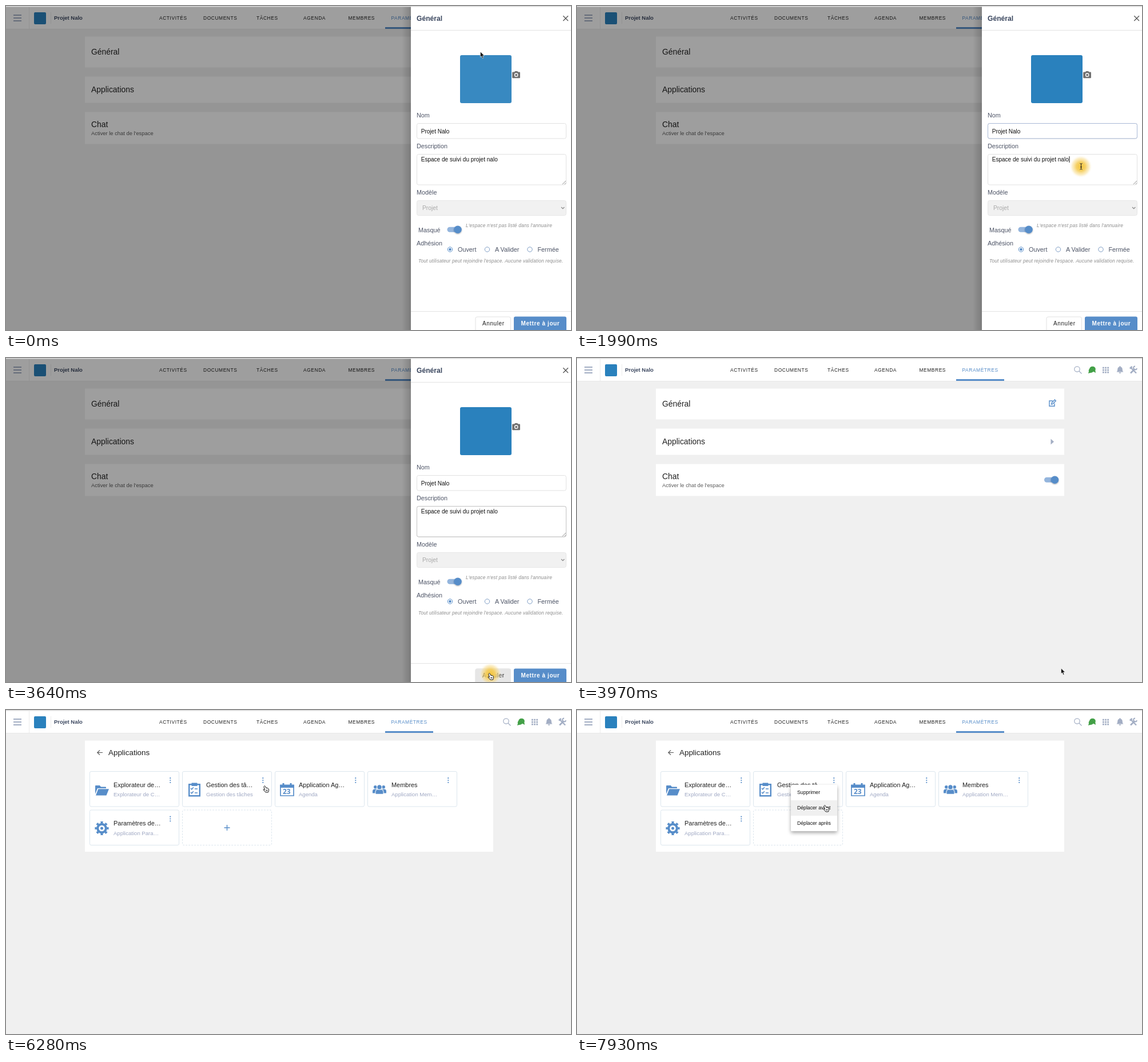
An HTML page that plays this animation: 988 px wide and 567 px high, repeating every 8000 ms.

```html
<!DOCTYPE html>
<html lang="fr">
<head>
<meta charset="utf-8">
<title>Paramètres de l'espace</title>
<style>
html, body { margin: 0; width: 100%; height: 100%; overflow: hidden; background: #f0f0f0; }
svg { display: block; }
text { font-family: "Liberation Sans", Arial, sans-serif; fill: #212121; white-space: pre; }
.title { font-size: 13.9px; }
.small { font-size: 9.4px; fill: #5c5c5c; }
.space { font-size: 9.45px; font-weight: bold; fill: #3b475f; }
.tabs text { font-size: 8.4px; letter-spacing: .6px; }
.heading { font-size: 12.1px; font-weight: bold; fill: #3b475f; }
.label { font-size: 10.8px; fill: #4d5466; }
.field { font-size: 10.05px; fill: #111; }
.note { font-size: 8.4px; letter-spacing: .15px; font-style: italic; fill: #8d8d8d; }
.button { font-size: 10px; letter-spacing: .6px; }
.app { font-size: 10.95px; }
.sub { font-size: 9.55px; fill: #a0a9c4; }
.menu text { font-size: 8.7px; fill: #111; }
.blue { fill: #578dc9; }
.line { fill: none; stroke: #578dc9; }
.muted { fill: #a3aec4; }
.box { fill: #fff; stroke: #e1e1e1; }
.card { fill: #fff; stroke: #dce6ee; }

.anim { animation: 8s step-end infinite; }
#drawer { animation-name: drawer; }
#settings { animation-name: settings; }
#apps { animation-name: apps; }
#avatar { animation-name: avatar; }
#nameFocus { animation-name: nameFocus; }
#nameCaret { animation-name: nameCaret; }
#textFocus { animation-name: textFocus; }
#textCaret { animation-name: textCaret; }
#cancelHover { animation-name: cancelHover; }
#openHover { animation-name: openHover; }
#menu { animation-name: menu; }
#ripple { animation-name: ripple; }
#rowHover { animation-name: rowHover; }
#halo { animation-name: halo; }
#cursor { animation-name: move; }
#arrow { animation-name: arrow; }
#hand { animation-name: hand; }
#beam { animation-name: beam; }

@keyframes drawer { 0% { visibility: visible } 49.625%, to { visibility: hidden } }
@keyframes settings { 0% { visibility: visible } 70.25%, to { visibility: hidden } }
@keyframes apps { 0% { visibility: hidden } 70.25%, to { visibility: visible } }
@keyframes avatar { 0% { opacity: .93 } 4.125%, to { opacity: 1 } }
@keyframes nameFocus { 0%, 29%, to { opacity: 0 } 20.75% { opacity: 1 } }
@keyframes nameCaret { 0%, 24.875%, to { opacity: 0 } 20.75% { opacity: 1 } }
@keyframes textFocus { 0% { opacity: 0 } 29%, to { opacity: 1 } }
@keyframes textCaret { 0%, 33.125%, 45.5%, to { opacity: 0 } 24.875%, 37.25% { opacity: 1 } }
@keyframes cancelHover { 0% { opacity: 0 } 45.5%, to { opacity: 1 } }
@keyframes openHover { 0% { opacity: 0 } 66.125%, to { opacity: 1 } }
@keyframes menu { 0% { opacity: 0 } 90.875%, to { opacity: 1 } }
@keyframes ripple { 0%, 95%, to { opacity: 0 } 90.875% { opacity: 1 } }
@keyframes rowHover { 0% { opacity: 0 } 95%, to { opacity: 1 } }
@keyframes halo {
  0%, 29%, 49.625%, to { opacity: 0 }
  24.875% { opacity: 1; transform: translate(881px, 281px) }
  45.5% { opacity: 1; transform: translate(847px, 553px) }
}
@keyframes move {
  0% { transform: translate(829px, 80px) }
  4.125% { transform: translate(883px, 150px) }
  8.25% { transform: translate(885px, 123px) }
  12.375% { transform: translate(899px, 156px) }
  16.5% { transform: translate(848px, 210px) }
  20.75% { transform: translate(874px, 267px) }
  24.875% { transform: translate(879px, 275px) }
  29% { transform: translate(902px, 371px) }
  33.125% { transform: translate(841px, 516px) }
  37.25% { transform: translate(829px, 515px) }
  41.375% { transform: translate(842px, 549px) }
  45.5% { transform: translate(842px, 551px) }
  49.625% { transform: translate(846px, 543px) }
  53.75% { transform: translate(312px, 166px) }
  57.875% { transform: translate(463px, 130px) }
  62% { transform: translate(777px, 137px) }
  66.125% { transform: translate(834px, 145px) }
  74.375% { transform: translate(829px, 145px) }
  78.5% { transform: translate(449px, 132px) }
  82.625% { transform: translate(436px, 120px) }
  86.75% { transform: translate(446px, 120px) }
  95% { transform: translate(437px, 151px) }
  99.125%, to { transform: translate(430px, 166px) }
}
@keyframes arrow {
  0%, 12.375%, 29%, 49.625%, 74.375% { opacity: 1 }
  8.25%, 16.5%, 41.375%, 66.125%, 78.5%, to { opacity: 0 }
}
@keyframes hand {
  0%, 12.375%, 49.625%, 74.375% { opacity: 0 }
  8.25%, 41.375%, 66.125%, 78.5%, to { opacity: 1 }
}
@keyframes beam { 0%, 29%, to { opacity: 0 } 16.5% { opacity: 1 } }
</style>
</head>
<body>
<svg width="988" height="567" viewBox="0 0 988 567">
  <defs>
    <radialGradient id="glow">
      <stop offset="0" stop-color="#f3c43c"/>
      <stop offset=".4" stop-color="#f5cc55" stop-opacity=".9"/>
      <stop offset=".75" stop-color="#f8dc8c" stop-opacity=".45"/>
      <stop offset="1" stop-color="#fff" stop-opacity="0"/>
    </radialGradient>
    <linearGradient id="edge">
      <stop offset="0" stop-opacity="0"/>
      <stop offset="1" stop-opacity=".17"/>
    </linearGradient>
    <filter id="shade" x="-20%" y="-20%" width="140%" height="150%">
      <feDropShadow dx="0" dy="3" stdDeviation="3" flood-opacity=".35"/>
    </filter>
    <filter id="lift" x="-50%" y="-50%" width="200%" height="200%">
      <feDropShadow dx="0" dy="1" stdDeviation="1" flood-opacity=".35"/>
    </filter>
    <g id="toggle">
      <rect y="-4.5" width="23" height="9" rx="4.5" fill="#94b5dd"/>
      <circle cx="18.5" r="6.8" class="blue" filter="url(#lift)"/>
    </g>
    <g id="dots" class="blue">
      <circle cy="-3.8" r="1.1"/><circle r="1.1"/><circle cy="3.8" r="1.1"/>
    </g>
    <rect id="tile" x=".5" y=".5" width="156" height="61.5" rx="2.5"/>
  </defs>

  <rect width="988" height="567" fill="#f0f0f0"/>
  <rect width="988" height="40" fill="#fff"/>
  <path d="M0 40.5H988" stroke="#e8e8e8"/>
  <path d="M40.5 2V40M78.5 11V31" stroke="#ececec"/>
  <path d="M13 16H27M13 21H27M13 26H27" stroke="#a3aec4" stroke-width="2"/>
  <rect x="49" y="11" width="21" height="21" rx="2" fill="#2a81bd"/>
  <text class="space" x="84" y="24.3">Projet Nalo</text>
  <g class="tabs">
    <text x="268" y="23.7">ACTIVITÉS</text>
    <text x="345" y="23.7">DOCUMENTS</text>
    <text x="438" y="23.7">TÂCHES</text>
    <text x="520" y="23.7">AGENDA</text>
    <text x="598.5" y="23.7">MEMBRES</text>
    <text x="673.5" y="23.7" style="fill:#578dc9">PARAMÈTRES</text>
  </g>
  <rect class="blue" x="663" y="37" width="84" height="3"/>

  <g fill="none" stroke="#a3aec4" stroke-width="1.2">
    <circle cx="874.5" cy="19.5" r="4.7"/><path d="M878 23L882.5 27.5"/>
  </g>
  <g fill="#43a047">
    <path d="M894 27l1-3.5a5 4.5 0 0 1 4-6l4 6q-3 3-6 2.500z"/>
    <ellipse cx="901.5" cy="19.5" rx="5.3" ry="4.8"/><path d="M902 23l5 3-1-6z"/>
  </g>
  <path d="M919 17.200H930M919 21.200H930M919 25.200H930" stroke="#a3aec4" stroke-width="2.8" stroke-dasharray="2.800 1.300"/>
  <path class="muted" d="M943.500 24.500q1.800-1.500 1.800-5a4.200 4.200 0 0 1 8.400 0q0 3.500 1.800 5zM947.500 25.300h4a2 1.800 0 0 1-4 0zM948.700 14h1.600v2h-1.600z"/>
  <g stroke="#a3aec4" fill="none">
    <path d="M969 17.500L978 26.500" stroke-width="2.300"/>
    <path d="M968 26.500L975.500 19" stroke-width="2.600"/>
    <path d="M976 14.500a3 3 0 1 0 3 3.500" stroke-width="1.800"/>
    <path d="M967 18.500L970.500 15" stroke-width="3"/>
  </g>

  <g id="settings" class="anim">
    <path d="M138 53.500h714v54H138zM138 123.500h714v46H138zM138 185.500h714v56H138z" fill="#fff"/>
    <text class="title" x="149" y="84.500">Général</text>
    <text class="title" x="149" y="151">Applications</text>
    <text class="title" x="149" y="211.500">Chat</text>
    <text class="small" x="149" y="225.700">Activer le chat de l'espace</text>
    <path class="line" stroke-width="1.400" d="M832 75h-6v9.300h9V79.500M829.500 81l.6-2.600 5.300-5.300 1.900 1.900-5.300 5.300z"/>
    <circle id="openHover" class="anim" cx="831" cy="146.500" r="9" fill="#eee"/>
    <path class="muted" d="M828.500 141.500l5.500 5-5.500 5z"/>
    <use href="#toggle" x="817" y="213.300"/>
  </g>

  <g id="apps" class="anim">
    <path d="M138 53.500h714v194.500H138z" fill="#fff"/>
    <path d="M169 74.500H160M164 70.300L159.800 74.500L164 78.700" fill="none" stroke="#555" stroke-width="1.200"/>
    <text x="179" y="79" style="font-size:13.400px">Applications</text>

    <g transform="translate(146 107)">
      <use href="#tile" class="card"/><use href="#dots" x="141.300" y="16"/>
      <path class="blue" d="M10 40V26q0-1 1-1h7l2 2.500h8q1 0 1 1V30H14zM15.300 31.300H34L29.500 42.500H11z"/>
      <text class="app" x="42" y="27.500">Explorateur de…</text><text class="sub" x="42" y="44.300">Explorateur de C…</text>
    </g>
    <g transform="translate(308 107)">
      <use href="#tile" class="card"/><use href="#dots" x="141.300" y="16"/>
      <path class="line" stroke-width="2.400" d="M12.200 23.200H30.800V43.300H12.200z"/>
      <path class="blue" d="M16.500 20.500h10V26h-10z"/>
      <path class="line" stroke-width="1.500" d="M15 30l1.800 1.800 3-3.500M15 37l1.800 1.800 3-3.500M22 31h5M22 38h5"/>
      <text class="app" x="42" y="27.500">Gestion des tâ…</text><text class="sub" x="42" y="44.300">Gestion des tâches</text>
    </g>
    <g transform="translate(470 107)">
      <use href="#tile" class="card"/><use href="#dots" x="141.300" y="16"/>
      <path class="line" stroke-width="1.700" d="M10 24.500H33V43H10z"/>
      <path class="blue" d="M9.200 23.700h24.600v5.300H9.200zM13.500 21h3v4h-3zM26.500 21h3v4h-3z"/>
      <text x="14" y="40.300" style="font:bold 12px 'Open Sans',sans-serif;fill:#578dc9">23</text>
      <text class="app" x="42" y="27.500">Application Ag…</text><text class="sub" x="42" y="44.300">Agenda</text>
    </g>
    <g transform="translate(632 107)">
      <use href="#tile" class="card"/><use href="#dots" x="141.300" y="16"/>
      <g class="blue">
        <circle cx="13.800" cy="27.800" r="2.800"/><circle cx="28.200" cy="27.800" r="2.800"/>
        <path d="M9 38.500V35q0-3.500 4-3.500h16q4 0 4 3.500v3.500z"/>
        <path stroke="#fff" d="M14 40.300V36q0-4 4-4h6q4 0 4 4v4.300z"/>
        <circle cx="21" cy="28" r="4.300" stroke="#fff"/>
      </g>
      <text class="app" x="42" y="27.500">Membres</text><text class="sub" x="42" y="44.300">Application Mem…</text>
    </g>
    <g transform="translate(146 174.500)">
      <use href="#tile" class="card"/><use href="#dots" x="141.300" y="16"/>
      <circle class="line" cx="21.500" cy="32.500" r="7.300" stroke-width="4"/>
      <circle class="line" cx="21.500" cy="32.500" r="10.300" stroke-width="3.600" pathLength="16" stroke-dasharray="1 1" stroke-dashoffset=".5"/>
      <circle class="blue" cx="21.500" cy="32.500" r="2.500"/>
      <text class="app" x="42" y="27.500">Paramètres de…</text><text class="sub" x="42" y="44.300">Application Para…</text>
    </g>
    <use href="#tile" x="308" y="174.500" class="card" stroke-dasharray="3 2"/>
    <path class="line" stroke-width="1.400" d="M381.500 206h10M386.500 201v10"/>

    <circle id="ripple" class="anim" cx="449.500" cy="123" r="12" fill="#578dc9" fill-opacity=".16"/>
    <g id="menu" class="menu anim">
      <rect x="374" y="131" width="81" height="81" rx="2" fill="#fff" filter="url(#shade)"/>
      <rect id="rowHover" class="anim" x="374" y="158" width="81" height="27" fill="#f0f0f0"/>
      <text x="385" y="147.300">Supprimer</text>
      <text x="385" y="174.300">Déplacer avant</text>
      <text x="385" y="201.300">Déplacer après</text>
    </g>
  </g>

  <g id="drawer" class="anim">
    <rect width="988" height="567" fill-opacity=".38"/>
    <rect x="692" width="16" height="567" fill="url(#edge)"/>
    <rect x="708" width="280" height="567" fill="#fff"/>
    <path d="M708 42.500H988M708 534.500H988" stroke="#e3e3e3"/>
    <text class="heading" x="718" y="26">Général</text>
    <path d="M974.300 17.300l8.700 8.700M983 17.300L974.300 26" stroke="#555" stroke-width="1.300"/>

    <rect id="avatar" class="anim" x="794" y="86" width="90" height="84" rx="3" fill="#2a81bd"/>
    <path d="M886.500 115.500h2.500l1.200-1.500h4l1.200 1.500h2.300q1.300 0 1.300 1.300v8.200q0 1.300-1.300 1.300h-11.200q-1.300 0-1.300-1.300v-8.200q0-1.300 1.300-1.300z" fill="#707070"/>
    <circle cx="892.200" cy="120.700" r="2.700" fill="#707070" stroke="#fff" stroke-width="1.300"/>

    <text class="label" x="718" y="195">Nom</text>
    <rect class="box" x="718.500" y="205.500" width="261" height="26.500" rx="3"/>
    <rect id="nameFocus" class="anim" x="718.500" y="205.500" width="261" height="26.500" rx="3" fill="none" stroke="#a9b9d6"/>
    <text class="field" x="725.700" y="222.700">Projet Nalo</text>
    <path id="nameCaret" class="anim" d="M776 213.500v11" stroke="#111"/>

    <text class="label" x="718" y="249">Description</text>
    <rect class="box" x="718.500" y="259.500" width="261" height="53.500" rx="3"/>
    <rect id="textFocus" class="anim" x="718.500" y="259.500" width="261" height="53.500" rx="3" fill="none" stroke="#c2c2c2"/>
    <path d="M973 312l6-6M976.500 312l2.500-2.500" stroke="#777" stroke-width=".8"/>
    <text class="field" x="725.700" y="272.300">Espace de suivi du projet nalo</text>
    <path id="textCaret" class="anim" d="M861 263v11" stroke="#111"/>

    <text class="label" x="718" y="330">Modèle</text>
    <rect x="718.500" y="340.500" width="261" height="26" rx="3" fill="#f1f1f1" stroke="#e6e6e6"/>
    <text x="728" y="357.300" style="font-size:10.300px;fill:#a9a9a9">Projet</text>
    <path d="M971 352l2.700 2.700 2.700-2.700" fill="none" stroke="#888" stroke-width="1.200"/>

    <text class="label" x="721" y="395.500">Masqué</text>
    <use href="#toggle" x="771.500" y="391.200"/>
    <text class="note" x="804" y="387">L'espace n'est pas listé dans l'annuaire</text>
    <text class="label" x="718" y="418.500">Adhésion</text>
    <g fill="#fff" stroke="#7d9cc4">
      <circle cx="776.500" cy="426" r="4.200" stroke="#578dc9"/>
      <circle cx="841.500" cy="426" r="4.200"/>
      <circle cx="916" cy="426" r="4.200"/>
    </g>
    <circle class="blue" cx="776.500" cy="426" r="2.300"/>
    <text class="label" x="790" y="429.600">Ouvert</text>
    <text class="label" x="855" y="429.600">A Valider</text>
    <text class="label" x="929.500" y="429.600">Fermée</text>
    <text class="note" x="721" y="449">Tout utilisateur peut rejoindre l'espace. Aucune validation requise.</text>

    <rect class="box" x="821" y="544" width="61.500" height="30" rx="3"/>
    <rect id="cancelHover" class="anim" x="820.500" y="543.500" width="62.500" height="30" rx="3" fill="#e6e6e6"/>
    <text class="button" x="833" y="559.200">Annuler</text>
    <rect class="blue" x="888" y="543.500" width="92" height="30" rx="3"/>
    <text class="button" x="900.500" y="559.200" style="font-weight:bold;fill:#fff">Mettre à jour</text>
  </g>

  <rect width="988" height="1.500" fill="#dadada"/>

  <circle id="halo" class="anim" r="20" fill="url(#glow)"/>
  <g id="cursor" class="anim">
    <path id="arrow" class="anim" d="M.5 0V9.500L2.700 7.600L4.300 11.500L6 10.800L4.400 7H7.500z" fill="#111" stroke="#fff" stroke-width=".6"/>
    <path id="hand" class="anim" d="M2.500 1.200q1.200-1 2 .4l1.300 3 1.200-.3 1.200.5 1.200.4q1 .4 1 1.600v2.700l-1 2.500H5L1.200 7.800q-.3-1.200 1-1l1.300 1L1.900 2.300q-.1-.8.6-1.100zM6 7.500v2.300M7.800 7.500v2.300" fill="#fff" stroke="#111"/>
    <path id="beam" class="anim" d="M.5.500q2 0 2 1.500 0-1.500 2-1.500M2.500 2v7.500M.5 11q2 0 2-1.500 0 1.500 2 1.500M1 6.800h3" fill="none" stroke="#222"/>
  </g>
</svg>
</body>
</html>
```
